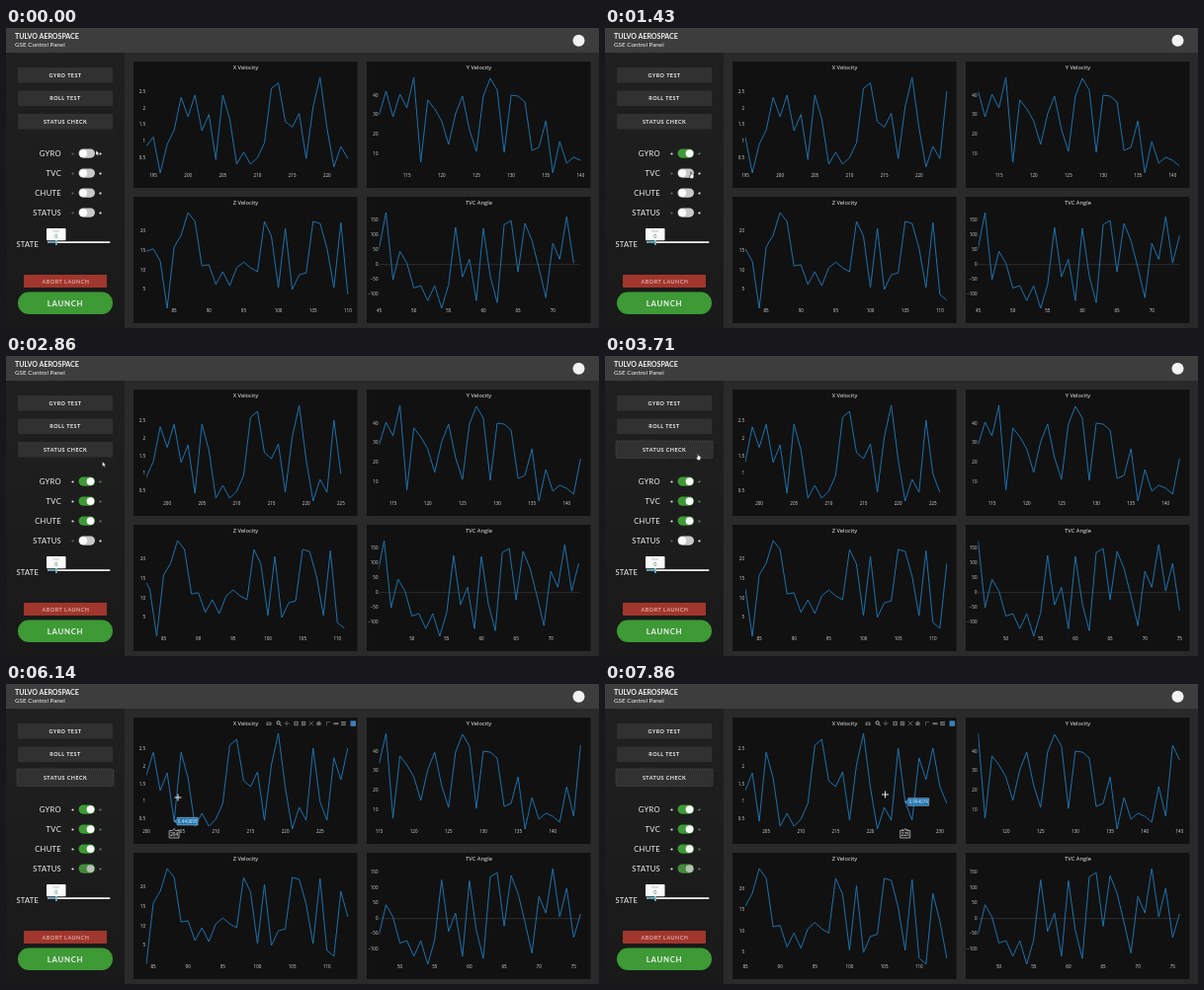
Animation, 600 px wide and 304 px high, one loop 8 s. Source, as an HTML page with a canvas:

```html
<!DOCTYPE html>
<html lang="en">
<head>
<meta charset="utf-8">
<title>Control panel</title>
<style>
html, body { margin: 0; width: 100%; height: 100%; overflow: hidden; background: #2a2a2a; }
canvas { display: block; width: 600px; height: 304px; }
</style>
</head>
<body>
<canvas id="stage" width="600" height="304"></canvas>
<script>
const ctx = document.getElementById('stage').getContext('2d');
const LOOP = 8000, STEP = 7.03, SPAN = 29, PLOT_W = STEP * SPAN, PLOT_H = 97;
const GREEN = '#3d9a35', WHITE = '#f2f2f2';
const LATO = 'Lato, sans-serif', OPEN = '"Open Sans", sans-serif';

const every = (period, count) => Array.from({ length: count }, (_, i) => (i + 1) * period);
const clamp = v => Math.min(1, Math.max(0, v));
const easeInOut = p => p < .5 ? 4 * p ** 3 : 1 - 4 * (1 - p) ** 3;
const mix = (a, b, p) => a + (b - a) * p;

// Each entry of `updates` is the moment the line gains a point; the axes pan just before it.
const charts = [
  { title: 'X Velocity', x: 129, y: 34, first: 194, tick: .5, updates: every(970, 8), data: [
    .85, 1.13, .03, .91, 1.34, 2.34, 1.75, 2.41, 1.32, 1.82, .440895, 2.41, 1.68, .3, .67, .3, .5, .95, 2.61,
    2.78, 1.6, 1.43, 1.85, .47, 2.05, 2.95, 1.4, .22, .84, .47, 2.53, .994074, .47, 2.25, 1.63, 2.53, 1.43, .95] },
  { title: 'Y Velocity', x: 365, y: 34, first: 111, tick: 10, updates: every(1425, 5), data: [
    30.1, 42.4, 29.1, 40.8, 33.7, 49.5, 5.6, 37.8, 33.2, 27, 14.8, 30.6, 39.8, 22.5, 11.2, 39.8, 49, 42.9,
    10.7, 40.3, 39.8, 36.7, 11.7, 13.3, 27, 0, 16.3, 5.1, 8.2, 6.6, 3.6, 21.9, 6.6, 43.4, 35.7] },
  { title: 'Z Velocity', x: 129, y: 171, first: 81, tick: 5, updates: [1050, 3200, 5400, 7500], data: [
    14.9, 15.5, 12.4, .15, 16, 19, 24.9, 22.6, 11.1, 11.4, 6.3, 9.6, 6, 10.6, 12.1, 10.6, 9.6, 22.6, 18.8,
    5.5, 20.8, 5, 8.8, 9.3, 22.6, 22.1, 15.7, 5.5, 22.3, 3.7, 2.2, 19, 12.4, 3.6] },
  { title: 'TVC Angle', x: 365, y: 171, first: 44, tick: 50, updates: [100, 3230, 5600], data: [
    60, 55, 177, -52, 45, 5, -80, -72, -123, -72, -149, -69, 126, -42, 18, -123, 123, -39, -130, 136, 150,
    -25, 140, 82, -12, -113, 72, 18, 163, 5, 99, -62, 15] }
];

const toggles = [['GYRO', 127, 500], ['TVC', 147, 1550], ['CHUTE', 167, 2050], ['STATUS', 187, 4300]];
const buttons = [['GYRO TEST', 40], ['ROLL TEST', 63.5], ['STATUS CHECK', 87]];
const cursorPath = [
  [0, 91, 124], [350, 85, 126], [700, 85, 126], [1430, 86.5, 146], [1650, 86, 147], [1950, 86, 166],
  [2300, 86, 166], [2860, 97.5, 107], [3300, 93.5, 99], [3900, 93.5, 99], [4860, 107.5, 147.5],
  [5200, 110, 146], [5800, 169, 118], [6140, 174, 115], [6700, 222, 114], [7250, 303, 113],
  [7600, 303, 113], [7860, 283.5, 112], [8000, 281, 112]];

function rect(x, y, w, h, fill, radius = 0, stroke) {
  ctx.beginPath();
  ctx.roundRect(x, y, w, h, radius);
  if (fill) { ctx.fillStyle = fill; ctx.fill(); }
  if (stroke) { ctx.strokeStyle = stroke; ctx.stroke(); }
}

function circle(x, y, r, fill) {
  ctx.beginPath();
  ctx.arc(x, y, r, 0, 7);
  ctx.fillStyle = fill;
  ctx.fill();
}

function path(points, color, width, close) {
  ctx.beginPath();
  points.forEach(([x, y]) => ctx.lineTo(x, y));
  if (close) { ctx.closePath(); ctx.fillStyle = close; ctx.fill(); }
  ctx.strokeStyle = color;
  ctx.lineWidth = width;
  ctx.stroke();
}

function text(str, x, y, font, { align = 'left', color = WHITE, spacing = 0 } = {}) {
  ctx.font = font;
  ctx.letterSpacing = spacing + 'px';
  ctx.textAlign = align;
  ctx.textBaseline = 'middle';
  ctx.fillStyle = color;
  ctx.fillText(str, x, y);
}

function cursorAt(t) {
  const i = Math.max(1, cursorPath.findIndex(k => k[0] >= t));
  const [t0, x0, y0] = cursorPath[i - 1], [t1, x1, y1] = cursorPath[i];
  const p = clamp((t - t0) / (t1 - t0)), s = p * p * (3 - 2 * p);
  return [mix(x0, x1, s), mix(y0, y1, s)];
}

function rangeAt(chart, start) {
  const visible = chart.data.slice(start, start + SPAN + 1);
  return [Math.min(...visible), Math.max(...visible)];
}

function layout(chart, t) {
  const committed = chart.updates.filter(u => u <= t).length;
  const offset = chart.updates.reduce((sum, u) => sum + easeInOut(clamp((t - u + 500) / 320)), 0);
  const from = rangeAt(chart, Math.floor(offset)), to = rangeAt(chart, Math.ceil(offset));
  const [low, high] = from.map((v, i) => mix(v, to[i], offset % 1));
  const left = chart.x + (chart.x < 200 ? 13 : 12.5), top = chart.y + 16;
  return {
    committed, offset, low, high, left, top,
    px: i => left + (i - offset) * STEP,
    py: v => top + (high - v) / (high - low) * PLOT_H
  };
}

function drawChart(chart, t) {
  const { committed, offset, low, high, left, top, px, py } = layout(chart, t);
  rect(chart.x, chart.y, 226.5, 128, '#111');
  text(chart.title, chart.x + 113.5, chart.y + 6.7, '5.8px ' + OPEN, { align: 'center' });

  const start = chart.first + offset;
  for (let n = Math.ceil((start - .01) / 5) * 5; n <= start + SPAN + .01; n += 5)
    text(n, px(n - chart.first), top + 99.5, '4.5px ' + OPEN, { align: 'center', color: '#ddd' });
  for (let v = Math.floor(low / chart.tick) * chart.tick + chart.tick; v < high; v += chart.tick)
    text(String(v).replace('-', '−'), left - 1, py(v), '4.5px ' + OPEN, { align: 'right', color: '#ddd' });
  if (low < 0) path([[left, py(0)], [left + PLOT_W, py(0)]], '#333', .8);

  ctx.save();
  ctx.beginPath();
  ctx.rect(left, chart.y, PLOT_W + .5, 128);
  ctx.clip();
  ctx.lineJoin = 'round';
  path(chart.data.slice(committed, committed + SPAN + 1).map((v, i) => [px(committed + i), py(v)]), '#1f77b4', .95);
  ctx.restore();
}

function drawModebar() {
  const gray = '#6c6c6c', y = 40;
  rect(263.5, 38.5, 5, 3.5, gray, .6);
  circle(266, 40.2, 1, '#222');
  ctx.lineWidth = 1;
  rect(274, 37.7, 3.2, 3.2, null, 1.6, '#bbb');
  path([[276.8, 40.6], [278.6, 42.4]], '#bbb', 1);
  path([[281.5, y], [286.5, y]], gray, .8);
  path([[284, 37.5], [284, 42.5]], gray, .8);
  for (const x of [293.5, 301]) {
    rect(x - 2.2, 37.8, 4.4, 4.4, gray);
    path([[x - 1.4, y], [x + 1.4, y]], '#161616', .7);
  }
  path([[293.5, 38.6], [293.5, 41.4]], '#161616', .7);
  path([[306.7, 37.8], [311.3, 42.2]], gray, .8);
  path([[306.7, 42.2], [311.3, 37.8]], gray, .8);
  path([[313.6, y], [316.5, 37.5], [319.4, y], [318.4, y], [318.4, 42], [314.6, 42], [314.6, y]], gray, .2, gray);
  path([[324.5, 42], [324.5, 38.5], [328, 38.5]], gray, .7);
  rect(331.5, 39, 5, 2.2, gray);
  rect(339, 38, 5, 1.7, gray);
  rect(339, 40.4, 5, 1.7, gray);
  rect(348.5, 37.3, 5.5, 5.5, '#3d7fc0');
}

function drawHover(t) {
  const chart = charts[0], view = layout(chart, t);
  const slot = Math.round((cursorAt(t - 300)[0] - view.left) / STEP);
  if (slot < 0) return;
  const index = view.committed + slot, x = view.px(index), y = view.py(chart.data[index]);
  path([[x, y], [x + 3, y - 2], [x + 3, y - 3.8], [x + 24, y - 3.8], [x + 24, y + 3.8], [x + 3, y + 3.8], [x + 3, y + 2]],
    '#b9d3e8', .5, '#1f77b4');
  text(chart.data[index].toFixed(6), x + 13.5, y + .2, '4.6px ' + OPEN, { align: 'center' });
  path([[x, 146.5], [x + 1.5, 148.5], [x + 5, 148.5], [x + 5, 156], [x - 5, 156], [x - 5, 148.5], [x - 1.5, 148.5]],
    '#ccc', .7, '#222');
  text(chart.first + index, x, 152.4, '4.6px ' + OPEN, { align: 'center' });
}

function drawToggle([label, y, onAt], t) {
  const p = clamp((t - onAt) / 150), on = p > .5, muted = label === 'STATUS' && on;
  text(label, 56, y + .4, '7.6px ' + LATO, { align: 'right', spacing: .3 });
  circle(67.5, y + .5, 1.1, on ? '#e4e4e4' : '#5c6c5a');
  circle(95.5, y + .5, 1.1, on ? '#5b8a55' : '#f4f4f4');
  rect(73.5, y - 4.5, 16.5, 9.2, on ? muted ? '#438a3c' : GREEN : '#c9c9c9', 4.6);
  circle(mix(78.2, 85.5, p), y + .1, 3.9, muted ? '#b4c1b1' : '#fafafa');
}

function drawSidebar(t) {
  const shade = ctx.createLinearGradient(0, 25, 0, 304);
  shade.addColorStop(0, '#202020');
  shade.addColorStop(1, '#191919');
  rect(0, 25, 120, 279, shade);
  for (const [label, y] of buttons) {
    const focused = y === 87 && t > 3600;
    rect(12, y, 96, 15.5, '#313131', 1);
    if (focused) {
      ctx.lineWidth = .7;
      ctx.setLineDash([1, 1]);
      rect(11.2, y - .8, 97.6, 17, null, 1, '#858585');
      ctx.setLineDash([]);
    }
    text(label, 60, y + 8, 'bold 5.4px ' + LATO, { align: 'center', spacing: .45 });
  }
  toggles.forEach(toggle => drawToggle(toggle, t));

  text('STATE', 10.5, 219.5, '7.6px ' + LATO, { spacing: .2 });
  rect(42, 216.2, 63.5, 1.7, '#f0f0f0', .8);
  rect(43, 216, 7, 2, '#5fa3b4');
  rect(50, 214, 1.8, 6, '#6fb5c6');
  rect(41, 203, 19.5, 12.2, '#fafafa', .8);
  text('State', 50.7, 206.5, '3.2px ' + LATO, { align: 'center', color: '#aaa' });
  text('0', 50.7, 211.4, '5px ' + LATO, { align: 'center', color: '#3b7a57' });

  rect(18, 250, 84, 13, '#a0362d', 1);
  text('ABORT LAUNCH', 60.5, 256.9, 'bold 5.4px ' + LATO, { align: 'center', color: '#dfa9a3', spacing: .5 });
  rect(12, 267.5, 96, 22.5, GREEN, 11.2);
  text('LAUNCH', 60, 279.2, 'bold 7.8px ' + LATO, { align: 'center', spacing: .7 });
}

function drawHeader() {
  rect(0, 0, 600, 25, '#3d3d3d');
  text('TULVO AEROSPACE', 9, 9, 'bold 7.1px ' + LATO, { spacing: -.05 });
  text('GSE Control Panel', 9, 17.3, '6.3px ' + LATO);
  circle(579.5, 12.8, 6, WHITE);
}

function drawCursor(t) {
  const [x, y] = cursorAt(t);
  const shape = points => points.map(([dx, dy]) => [x + dx, y + dy]);
  const overToggle = x > 73 && x < 90 && y > 120 && y < 193;
  const overButton = x < 108 && y > 87 && y < 103;
  if (x > 129) {
    path(shape([[-3.5, 0], [3.5, 0]]), '#fff', .9);
    path(shape([[0, -3.5], [0, 3.5]]), '#fff', .9);
  } else if (overToggle || overButton) {
    path(shape([[0, 0], [1, 0], [1, 2], [3.3, 2.6], [3.3, 5], [2.6, 6.4], [.2, 6.4], [-1.4, 3.8], [0, 3.8]]), '#222', .5, '#fff');
  } else {
    path(shape([[0, 0], [0, 5], [1.2, 4], [2, 5.8], [2.8, 5.4], [2, 3.7], [3.5, 3.6]]), '#222', .4, '#fff');
  }
}

function frame(now) {
  const t = now % LOOP;
  rect(0, 0, 600, 304, '#2a2a2a');
  drawHeader();
  drawSidebar(t);
  charts.forEach(chart => drawChart(chart, t));
  if (cursorAt(t)[0] > 129) {
    drawModebar();
    drawHover(t);
  }
  drawCursor(t);
  requestAnimationFrame(frame);
}
requestAnimationFrame(frame);
</script>
</body>
</html>
```
